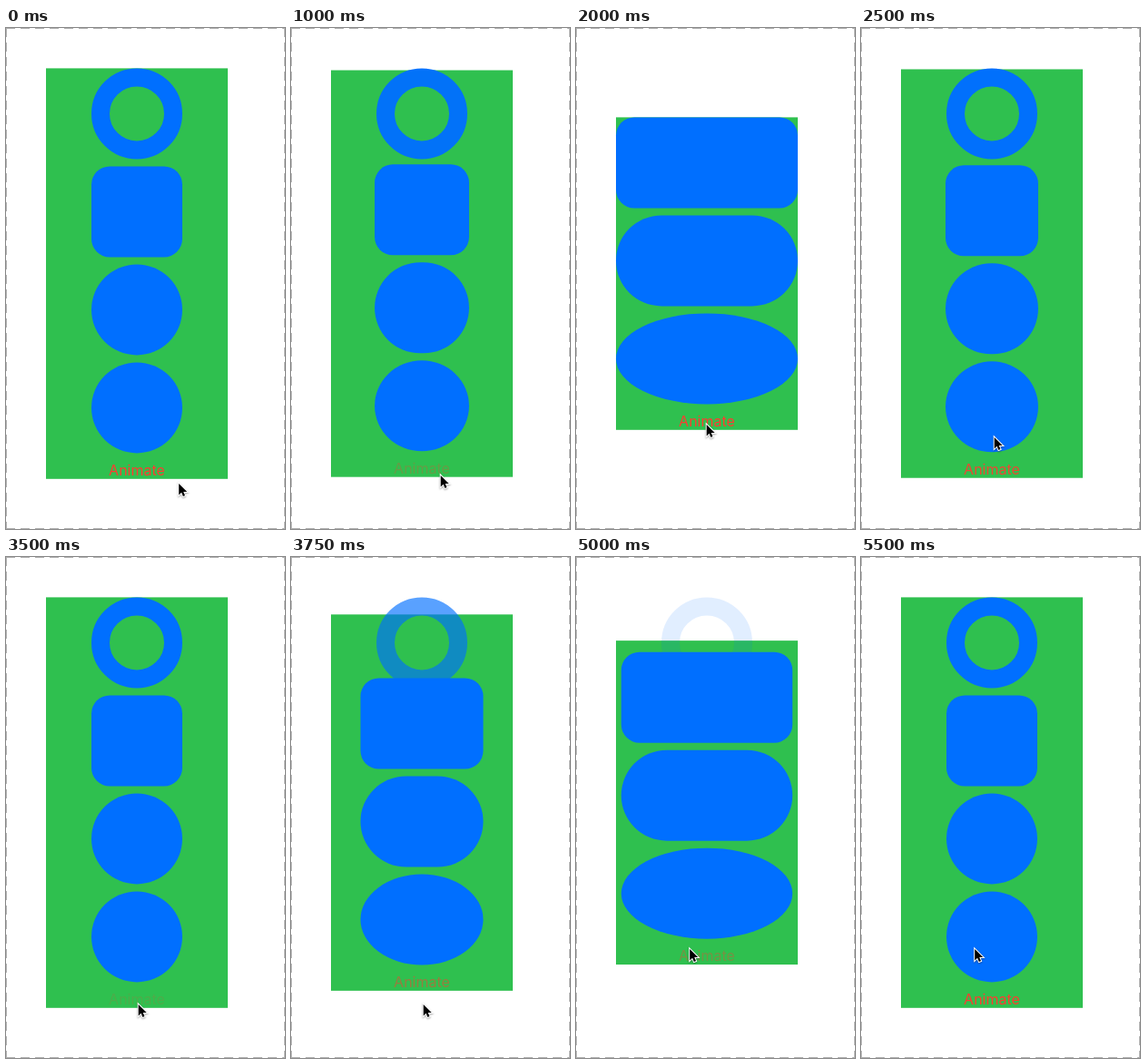
Write an HTML page with a canvas that moves like this. It is 307 px wide and 552 px high and loops after 6000 ms.

```html
<!DOCTYPE html>
<html lang="en">
<head>
<meta charset="utf-8">
<title>Animate</title>
<style>
  html, body { margin: 0; width: 100%; height: 100%; overflow: hidden; background: #fff; }
  canvas { display: block; width: 307px; height: 552px; }
</style>
</head>
<body>
<canvas></canvas>
<script>
const W = 307, H = 552, LOOP = 6000, STEP = 250;
const GREEN = '#2fc04f', BLUE = '#006fff', RED = '#ff3b30';
const DURATION = 350, PRESS = 120;
const releases = [951, 2185, 3606, 4917];

// Pointer stops: time, x, y
const pointer = [
  [0, 189, 500], [250, 185, 499], [500, 180, 498], [750, 165, 491], [1000, 163.5, 491],
  [1500, 154, 479], [1750, 141.5, 436.5], [2000, 142.5, 435], [2500, 145.5, 449],
  [2750, 150, 511], [3000, 144, 496], [3250, 144.5, 491], [4250, 127.5, 450],
  [4500, 120, 422], [4750, 124, 430]
];
const arrow = new Path2D('M0 0V12.6L2.9 9.8L4.7 14.1L6.8 13.2L5 9H9Z');

const canvas = document.querySelector('canvas');
const ctx = canvas.getContext('2d');
const ratio = window.devicePixelRatio || 1;
canvas.width = W * ratio;
canvas.height = H * ratio;

const clamp = v => Math.min(1, Math.max(0, v));

// cubic-bezier(.42, 0, .58, 1)
function easeInOut(u) {
  let lo = 0, hi = 1, s = 0.5;
  for (let i = 0; i < 20; i++) {
    const x = 1.26 * s * (1 - s) ** 2 + 1.74 * s * s * (1 - s) + s ** 3;
    if (x < u) lo = s; else hi = s;
    s = (lo + hi) / 2;
  }
  return s * s * (3 - 2 * s);
}

function stateAt(t) {
  let wide = 0, label = 1;
  releases.forEach((start, i) => {
    if (t < start - PRESS) return;
    const u = clamp((t - start) / DURATION);
    label = 0.15 + 0.85 * u;
    if (t >= start) wide = i % 2 ? 1 - easeInOut(u) : easeInOut(u);
  });
  return { wide, label };
}

function fillPath(color, build) {
  ctx.fillStyle = color;
  ctx.beginPath();
  build();
  ctx.fill();
}

function drawBorder() {
  ctx.strokeStyle = '#b0b0b0';
  ctx.lineWidth = 1;
  ctx.setLineDash([10, 6]);
  for (const [x1, y1, x2, y2] of [
    [0, 0.5, W, 0.5], [0, H - 0.5, W, H - 0.5], [0.5, 0, 0.5, H], [W - 0.5, 0, W - 0.5, H]
  ]) {
    ctx.beginPath();
    ctx.moveTo(x1, y1);
    ctx.lineTo(x2, y2);
    ctx.stroke();
  }
  ctx.setLineDash([]);
}

function drawPanel({ wide, label }) {
  const shift = 54 * wide, x = 94 - 50 * wide, w = 100 + 100 * wide;
  ctx.save();
  ctx.translate(0, 0.4);
  ctx.fillStyle = GREEN;
  ctx.fillRect(44, 44 + shift, 200, 452.4 - 2 * shift);

  ctx.globalAlpha = 1 - wide;
  ctx.strokeStyle = BLUE;
  ctx.lineWidth = 20;
  ctx.beginPath();
  ctx.arc(144, 94, 40, 0, 2 * Math.PI);
  ctx.stroke();
  ctx.globalAlpha = 1;

  fillPath(BLUE, () => ctx.roundRect(x, 152 - shift, w, 100, 20));
  fillPath(BLUE, () => ctx.roundRect(x, 260 - shift, w, 100, 50));
  fillPath(BLUE, () => ctx.ellipse(144, 418 - shift, w / 2, 50, 0, 0, 2 * Math.PI));

  ctx.globalAlpha = label;
  ctx.fillStyle = RED;
  ctx.font = '16px Inter, sans-serif';
  ctx.textAlign = 'center';
  ctx.fillText('Animate', 144, 492.6 - shift);
  ctx.restore();
}

function drawPointer(t) {
  const [, x, y] = pointer.findLast(stop => stop[0] <= t);
  ctx.save();
  ctx.translate(x + 1.2, y + 1.9);
  ctx.shadowColor = 'rgba(0,0,0,.35)';
  ctx.shadowBlur = 2 * ratio;
  ctx.shadowOffsetY = ratio;
  ctx.strokeStyle = '#fff';
  ctx.lineWidth = 2;
  ctx.stroke(arrow);
  ctx.shadowColor = 'transparent';
  ctx.fillStyle = '#000';
  ctx.fill(arrow);
  ctx.restore();
}

function draw() {
  // The picture updates four times a second.
  const t = Math.floor(performance.now() % LOOP / STEP) * STEP;
  ctx.setTransform(ratio, 0, 0, ratio, 0, 0);
  ctx.fillStyle = '#fff';
  ctx.fillRect(0, 0, W, H);
  drawBorder();
  drawPanel(stateAt(t));
  drawPointer(t);
  requestAnimationFrame(draw);
}
draw();
</script>
</body>
</html>
```
